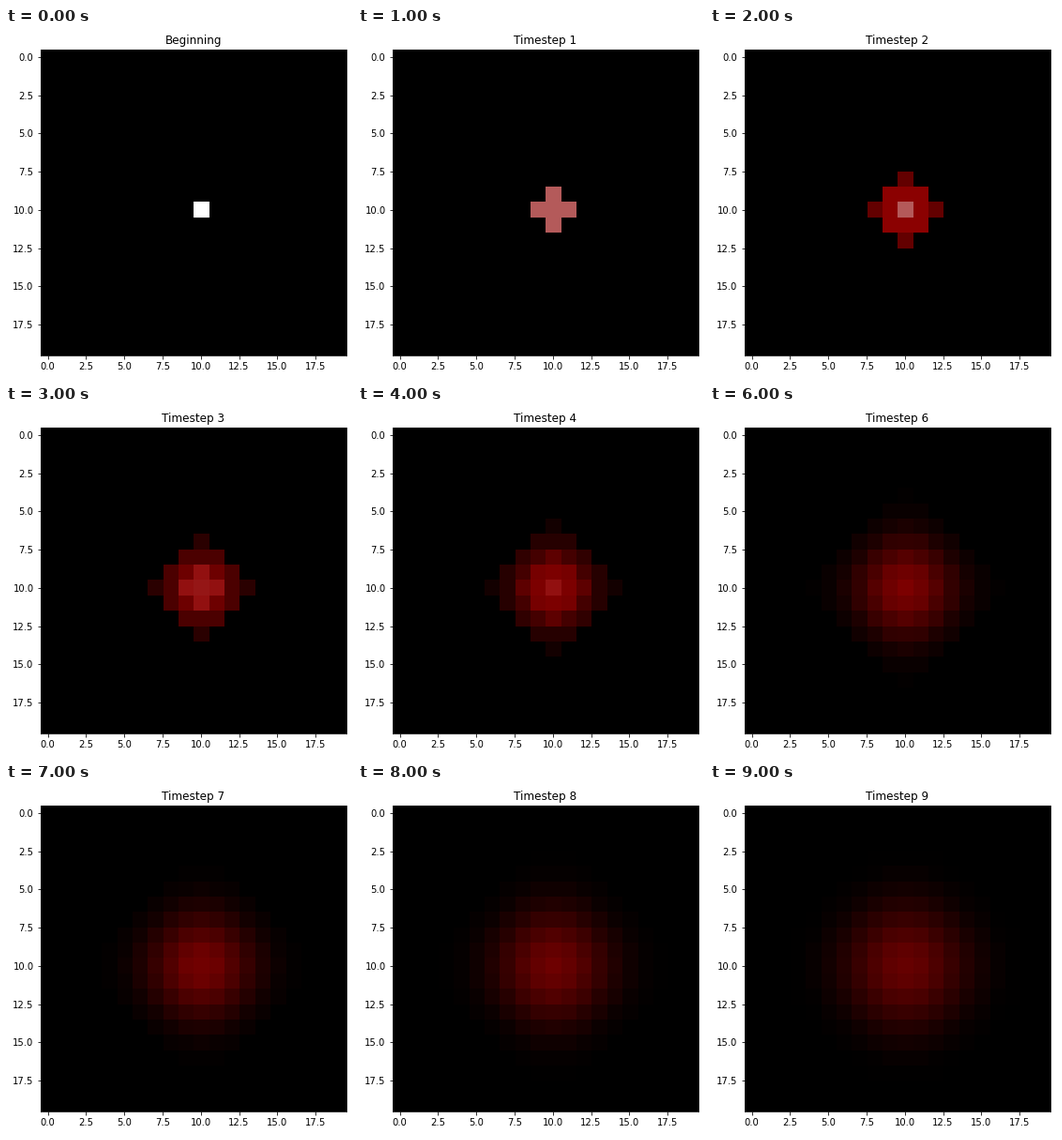
A matplotlib script that plays this animation: 369 px wide and 373 px high, repeating every 10000 ms.

```python
import matplotlib.pyplot as plt
import numpy as np
from matplotlib.animation import FuncAnimation
from matplotlib.colors import LinearSegmentedColormap

W, H, DPI = 369, 373, 72
LEFT, BOTTOM, SIDE = 36.55, 24.2, 326.16
N, STEPS = 20, 10


def spread(u):
    """Replace each cell by the mean of itself and its four neighbours."""
    p = np.pad(u, 1)
    return (u + p[:-2, 1:-1] + p[2:, 1:-1] + p[1:-1, :-2] + p[1:-1, 2:]) / 5


def field(step):
    u = np.zeros((N, N))
    u[N // 2, N // 2] = 1
    for _ in range(step):
        u = spread(u)
    return np.sqrt(u)


heat = LinearSegmentedColormap.from_list(
    "heat", [(0, "black"), (0.28, "#8b0000"), (0.75, "white"), (1, "white")])

plt.rcParams.update({"font.family": "DejaVu Sans", "font.size": 10})
fig = plt.figure(figsize=(W / DPI, H / DPI), dpi=DPI, facecolor="white")
ax = fig.add_axes([LEFT / W, BOTTOM / H, SIDE / W, SIDE / H])
img = ax.imshow(field(0), cmap=heat, vmin=0, vmax=1,
                interpolation="nearest", aspect="auto")
ticks = np.arange(0, N, 2.5)
ax.set_xticks(ticks)
ax.set_yticks(ticks)
title = ax.set_title("Beginning", fontsize=12)


def draw(step):
    img.set_data(field(step))
    title.set_text(f"Timestep {step}" if step else "Beginning")
    return img, title


anim = FuncAnimation(fig, draw, frames=STEPS, interval=1000,
                     init_func=lambda: draw(0), repeat=True, repeat_delay=0)
plt.show()
```
